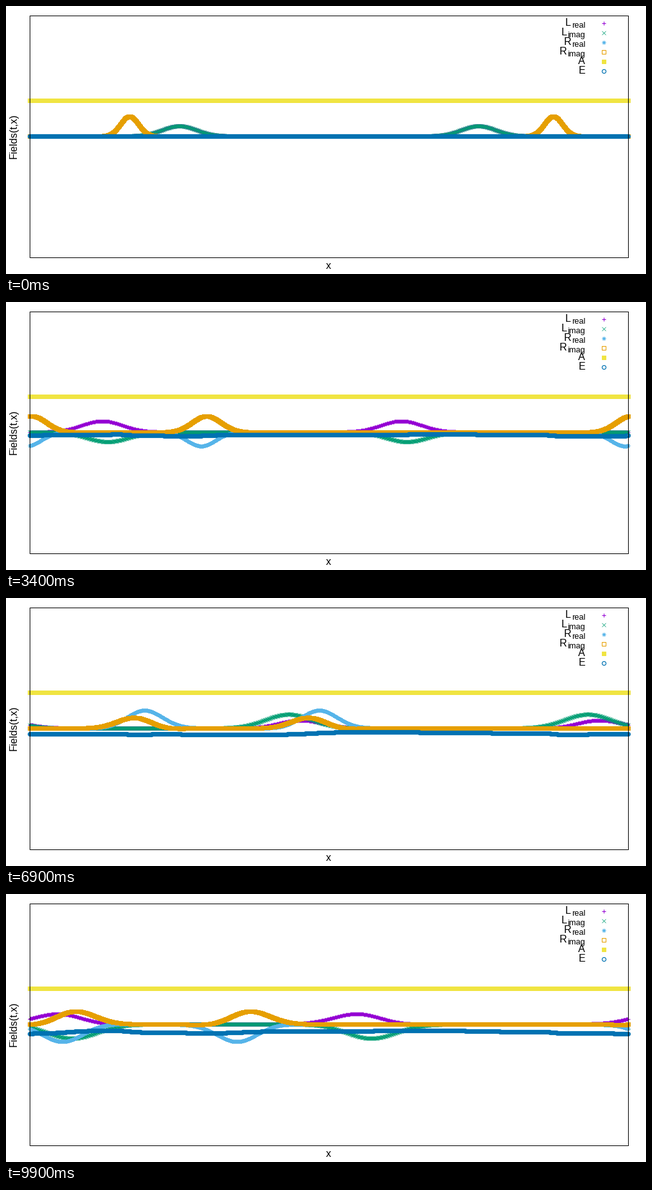
A matplotlib script that plays this animation: 1000 px wide and 420 px high, repeating every 10000 ms.

```python
import numpy as np
import matplotlib.pyplot as plt
from matplotlib.animation import FuncAnimation
from matplotlib.patches import Rectangle

W, H, DPI = 1000, 420, 100
PX = 72 / DPI                      # points per pixel
LEFT, RIGHT, TOP, BOTTOM = 37, 972, 15, 394
SPAN = RIGHT - LEFT
ZERO, A_LEVEL = 204, 148
FRAMES, SUB = 100, 16

SPEED = SPAN / 16                  # pixels per frame
SPIN = 3.0007                      # radians per frame
SPREAD = 9.7                       # growth of the squared width
GROWTH = 0.0058
TWIST = -0.13                      # phase tilt gained per frame

x = np.linspace(LEFT, RIGHT, SPAN + 1)

# start positions (share of the box), amplitude, width, direction, charge step
R_WAVE = ((1 / 6, 7 / 8), 44.0, 14.0, 1, -2.3)
L_WAVE = ((1 / 4, 3 / 4), 22.6, 27.0, -1, 0.95)


def offset(start, direction, t):
    """Signed periodic distance from the packet's centre."""
    d = x - LEFT - start * SPAN - direction * SPEED * t
    return (d + SPAN / 2) % SPAN - SPAN / 2


def wave(spec, t):
    starts, amp, sigma, direction, _ = spec
    var = sigma ** 2 + SPREAD * t
    height = amp * sigma / np.sqrt(var) * np.exp(GROWTH * t)
    phase = np.pi / 4 + direction * SPIN * t
    total = np.zeros_like(x, dtype=complex)
    for start in starts:
        d = offset(start, direction, t)
        total += height * np.exp(-d ** 2 / (2 * var)
                                 + 1j * (phase + TWIST * t / var * d))
    return total


def current(spec, t):
    starts, _, sigma, direction, step = spec
    var = sigma ** 2 + SPREAD * t
    scale = step * sigma / var / np.sqrt(np.pi) * np.exp(2 * GROWTH * t)
    return scale * sum(np.exp(-offset(s, direction, t) ** 2 / var)
                       for s in starts)


def electric_history():
    field = np.zeros_like(x)
    history = [field.copy()]
    for n in range(FRAMES - 1):
        for j in range(SUB):
            t = n + (j + 0.5) / SUB
            field += (current(R_WAVE, t) + current(L_WAVE, t)) * SPEED / SUB
        history.append(field.copy())
    return history


E_FIELD = electric_history()

plt.rcParams["font.family"] = "Liberation Sans"
fig = plt.figure(figsize=(W / DPI, H / DPI), dpi=DPI, facecolor="white")
ax = fig.add_axes([0, 0, 1, 1])
ax.set_xlim(0, W)
ax.set_ylim(H, 0)
ax.axis("off")

# label, subscript, marker, stroke in pixels, colour, filled
SERIES = [
    ("L", "real", "+", 1, "#9400d3", False),
    ("L", "imag", "x", 0.7, "#009e73", False),
    ("R", "real", (8, 2, 0), 0.7, "#56b4e9", False),
    ("R", "imag", "s", 1, "#e69f00", False),
    ("A", "", "s", 1, "#f0e442", True),
    ("E", "", "o", 1.2, "#0072b2", False),
]


def points(px, py, marker, stroke, color, filled, z):
    line, = ax.plot(px, py, ls="none", marker=marker, ms=6 * PX,
                    mec=color, mfc=color if filled else "none",
                    mew=stroke * PX, antialiased=False, zorder=z,
                    clip_on=False)
    return line


def text(px, py, s, size=16, **kw):
    kw = {"ha": "right", "va": "baseline", **kw}
    return ax.text(px, py, s, fontsize=size * PX, color="black",
                   zorder=20, **kw)


SUB_WIDTH = {"real": 22, "imag": 28.5, "": 0}
lines = []
for i, (name, sub, *style) in enumerate(SERIES):
    row = 27 + 15 * i
    lines.append(points(x, np.full_like(x, ZERO), *style, 2 + i))
    points([934], [row], *style, 15)
    text(905 - SUB_WIDTH[sub], row + 4, name)
    if sub:
        text(905, row + 7.5, sub, 12.8)

ax.add_patch(Rectangle((LEFT, TOP), SPAN, BOTTOM - TOP, fill=False,
                       ec="black", lw=PX, antialiased=False, zorder=12))
text(504, 412, "x", ha="center")
text(20, 203.5, "Fields(t,x)", va="center", rotation=90)


def draw(n):
    left, right = wave(L_WAVE, n), wave(R_WAVE, n)
    fields = (left.real, left.imag, right.real, right.imag,
              np.full_like(x, ZERO - A_LEVEL), E_FIELD[n])
    for line, f in zip(lines, fields):
        line.set_ydata(ZERO - f)
    return lines


anim = FuncAnimation(fig, draw, frames=FRAMES, init_func=lambda: draw(0),
                     interval=100, repeat=True, repeat_delay=0, blit=False)
plt.show()
```
